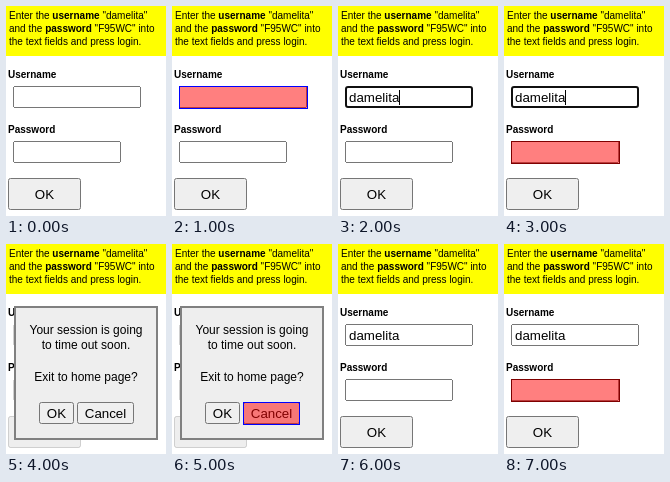
Animation, 160 px wide and 210 px high, one loop 8000 ms. Source, as an HTML page:

```html
<!DOCTYPE html>
<html lang="en">
<head>
<meta charset="utf-8">
<title>Login form</title>
<style>
html, body { margin: 0; width: 100%; height: 100%; overflow: hidden; background: #fff; }
body { font: 10px/13px "Liberation Sans", Arial, sans-serif; color: #000; cursor: default; }
body * { position: absolute; box-sizing: border-box; margin: 0; }
#query { left: 0; top: 0; width: 160px; height: 50px; padding: 3px; background: #ff0; white-space: pre; }
#query b { position: static; }
label { left: 2px; font-weight: bold; line-height: 11px; }
input, button { font: 13.333px "Liberation Sans", Arial, sans-serif; }
input { left: 7px; height: 22px; padding: 1px 2px; }
button { padding: 0; white-space: nowrap; }
.focus { outline: 1px auto #101010; }
#caret { left: 61px; top: 84px; width: 1px; height: 15px; background: #000; }
#dialog { left: 8px; top: 62px; width: 144px; height: 134px; border: 2px solid #808080; background: #eee; }
#dialog p { left: 0; width: 100%; text-align: center; font-size: 12px; line-height: 15px; white-space: pre; }
#dialog button { top: 94px; height: 22px; }
.mark { height: 23px; border: 1px solid #00f; background: rgba(255, 0, 0, .5); }
[hidden] { display: none; }
</style>
</head>
<body>
<div id="query">Enter the <b>username</b> "damelita"
and the <b>password</b> "F95WC" into
the text fields and press login.</div>

<label style="top:63px">Username</label>
<input id="user" style="top:80px;width:128px" readonly tabindex="-1">
<div id="caret"></div>
<label style="top:118px">Password</label>
<input id="pass" style="top:135px;width:108px" readonly tabindex="-1">
<button id="login" style="left:2px;top:172px;width:73px;height:32px" tabindex="-1">OK</button>

<div id="dialog">
  <p style="top:15px">Your session is going
to time out soon.</p>
  <p style="top:62px">Exit to home page?</p>
  <button style="left:23px;width:35px" tabindex="-1">OK</button>
  <button style="left:61px;width:57px" tabindex="-1">Cancel</button>
</div>

<div class="mark" id="markUser" style="left:7px;top:80px;width:129px"></div>
<div class="mark" id="markPass" style="left:7px;top:135px;width:109px;border-color:#7f0000"></div>
<div class="mark" id="markCancel" style="left:71px;top:158px;width:57px"></div>

<script>
const $ = id => document.getElementById(id);
const show = (id, on) => { $(id).hidden = !on; };
let current = -1;

function render(step) {
  const typing = step === 2 || step === 3;
  const popup = step === 4 || step === 5;
  $('user').value = step >= 2 ? 'damelita' : '';
  $('user').classList.toggle('focus', typing);
  for (const id of ['user', 'pass', 'login']) $(id).disabled = popup;
  show('caret', typing);
  show('dialog', popup);
  show('markUser', step === 1);
  show('markPass', step === 3 || step === 7);
  show('markCancel', step === 5);
}

function tick() {
  const step = Math.floor(performance.now() / 1000) % 8;
  if (step !== current) render(current = step);
  requestAnimationFrame(tick);
}
tick();
</script>
</body>
</html>
```
